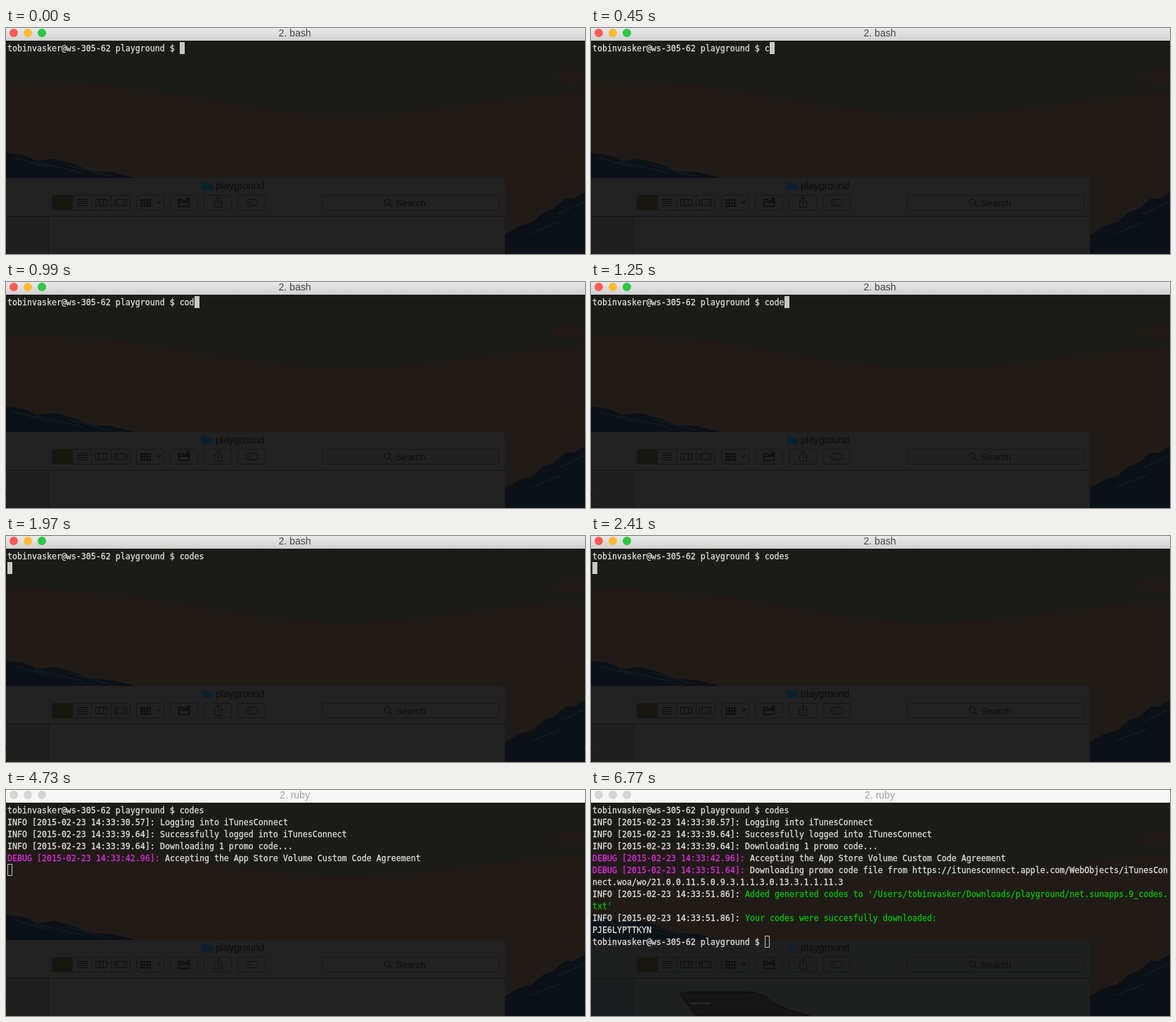
Recreate the animation shown at these times as an HTML page with a canvas. Size 823 by 321 pixels, loop 8 s.

```html
<!DOCTYPE html>
<html lang="en">
<head>
<meta charset="utf-8">
<title>Terminal</title>
<style>
html, body { margin: 0; width: 100%; height: 100%; overflow: hidden; background: #1b1b17; }
canvas { display: block; }
</style>
</head>
<body>
<canvas id="stage" width="823" height="321"></canvas>
<script>
const ctx = document.getElementById('stage').getContext('2d');
const LOOP = 8000, CELL = 7, ROW = 17, LEFT = 2, TOP = 20;
const MONO = '11.627px "DejaVu Sans Mono", monospace';
const SANS = '"Liberation Sans", Arial, sans-serif';
const WHITE = '#dcdcd8', MAGENTA = '#d32fd3', GREEN = '#04c204';
const USER = 'tobinvasker';
const PROMPT = USER + '@ws-305-62 playground $ ';
const COMMAND = 'codes';
const KEY_TIMES = [450, 720, 990, 1250, 1610];
const ENTER = 1970, LOGIN = 2940, DOWNLOAD = 4730, DONE = 6770;

const entry = (at, level, time, text, color = WHITE) => ({
  at, color, text,
  prefix: `${level} [2015-02-23 14:33:${time}]: `,
  prefixColor: level === 'DEBUG' ? MAGENTA : WHITE
});
const plain = (at, text, color = WHITE) => ({ at, text, color, prefix: '' });

const output = [
  entry(LOGIN, 'INFO', '30.57', 'Logging into iTunesConnect'),
  entry(DOWNLOAD, 'INFO', '39.64', 'Successfully logged into iTunesConnect'),
  entry(DOWNLOAD, 'INFO', '39.64', 'Downloading 1 promo code...'),
  entry(DOWNLOAD, 'DEBUG', '42.96', 'Accepting the App Store Volume Custom Code Agreement'),
  entry(DONE, 'DEBUG', '51.64', 'Downloading promo code file from https://itunesconnect.apple.com/WebObjects/iTunesCon'),
  plain(DONE, 'nect.woa/wo/21.0.0.11.5.0.9.3.1.1.3.0.13.3.1.1.11.3'),
  entry(DONE, 'INFO', '51.86', `Added generated codes to '/Users/${USER}/Downloads/playground/net.sunapps.9_codes.`, GREEN),
  plain(DONE, "txt'", GREEN),
  entry(DONE, 'INFO', '51.86', 'Your codes were succesfully downloaded:', GREEN),
  plain(DONE, 'PJE6LYPTTKYN'),
  plain(DONE, PROMPT)
];

function rect(x, y, w, h, color) {
  ctx.fillStyle = color;
  ctx.fillRect(x, y, w, h);
}

function shape(path, fill, stroke, width = 1) {
  const p = new Path2D(path);
  if (fill) { ctx.fillStyle = fill; ctx.fill(p); }
  if (stroke) { ctx.strokeStyle = stroke; ctx.lineWidth = width; ctx.stroke(p); }
}

function box(x, y, w, h, radius, stroke, fill) {
  ctx.beginPath();
  ctx.roundRect(x + .5, y + .5, w - 1, h - 1, radius);
  if (fill) { ctx.fillStyle = fill; ctx.fill(); }
  ctx.strokeStyle = stroke;
  ctx.lineWidth = 1;
  ctx.stroke();
}

function label(text, x, y, size, color, align = 'left') {
  ctx.font = `${size}px ${SANS}`;
  ctx.textAlign = align;
  ctx.fillStyle = color;
  ctx.fillText(text, x, y);
}

function drawWallpaper() {
  rect(0, 18, 823, 303, '#211b18');
  shape('M0 18H823V60Q790 54 769 72Q790 82 823 80V92C750 94 690 104 620 113C560 121 480 126 410 119C320 110 240 91 150 82Q70 74 0 75Z', '#1b1b17');
  shape('M0 177L28 181L44 189L70 186L98 194L121 203L152 205L188 214H0Z', '#0b1116');
  shape('M10 184L60 198M40 190L110 206M88 195L150 211', null, '#101a21', 2);
  shape('M823 233L806 243L796 242L778 257L764 262L748 276L730 281L709 293V321H823Z', '#0b1116');
  shape('M823 246L785 264M790 274L745 292', null, '#101a21', 2);
}

function drawToolbarIcons(ink) {
  for (let y = 243; y <= 252; y += 3) shape(`M101 ${y + .5}H116`, null, ink);
  shape('M127.5 243.5H143.5V252.5H127.5ZM132.5 243V253M138.5 243V253', null, ink);
  shape('M154.5 243V253M157.5 243.5H168.5V252.5H157.5ZM171.5 243V253', null, ink);
  for (let y = 243; y < 253; y += 4)
    for (let x = 191; x < 207; x += 4) rect(x, y, 3, 3, ink);
  shape('M214 246L217 249L220 245', null, ink, 1.4);
  shape('M245.5 253.5V243.5H250L252 245.5H260.5V253.5ZM246 247.5H260M256 243H262M259 240V246', null, ink, 1.4);
  shape('M299 245.5H296.5V254.5H306.5V245.5H304M301.5 251V240M298.5 243L301.5 240L304.5 243', null, ink);
  box(341, 243, 17, 10, 4, ink);
  rect(345, 247, 2, 2, ink);
  shape('M546 247A4 4 0 1 1 538 247A4 4 0 1 1 546 247M545 250L549 254', null, ink, 1.2);
}

function drawFinder(done) {
  const ink = '#0e0e0e', line = '#171717';
  ctx.beginPath();
  ctx.roundRect(-6, 213, 715, 120, 5);
  ctx.fillStyle = done ? '#1e1f1f' : '#212121';
  ctx.fill();
  rect(0, 267, 709, 1, '#151515');
  rect(0, 268, 60, 53, done ? '#1c1d1e' : '#1f1f1f');
  rect(60, 268, 1, 53, '#151515');
  rect(0, 299, 1, 5, ink);
  rect(0, 318, 4, 1, ink);

  shape('M278 220Q278 219 279 219H284L286 221H293Q294 221 294 222V229Q294 230 293 230H279Q278 230 278 229Z', done ? '#142027' : '#0b202c');
  label('playground', 298, 229, 14, ink);

  box(65, 237, 112, 22, 3, line);
  rect(66, 238, 28, 20, '#17170f');
  [94, 121, 149].forEach(x => rect(x, 238, 1, 20, line));
  [185, 233, 281, 329].forEach(x => box(x, 237, 40, 22, 3, line));
  box(449, 237, 252, 22, 3, line);
  drawToolbarIcons(ink);
  label('Search', 554, 253, 13.6, ink);

  if (done) {
    shape('M126 290Q128 287 136 287H226Q242 288 252 297Q270 311 312 321H150Z', '#151515', '#0b0b0b');
    shape('M142 303H170', null, '#292929', 2);
  }
}

function drawTitleBar(time) {
  const active = time < LOGIN;
  const bar = ctx.createLinearGradient(0, 0, 0, 18);
  bar.addColorStop(0, active ? '#e9e9e9' : '#f6f6f6');
  bar.addColorStop(1, active ? '#d1d1d1' : '#f6f6f6');
  rect(0, 0, 823, 18, bar);
  const lights = active ? ['#fc5b57', '#fdbb32', '#2fc744'] : Array(3).fill('#d5d5d5');
  lights.forEach((color, i) => {
    ctx.beginPath();
    ctx.arc(11 + 20 * i, 7, 6, 0, Math.PI * 2);
    ctx.fillStyle = color;
    ctx.fill();
  });
  const title = active ? '2. bash' : time < DOWNLOAD ? '2. sh' : '2. ruby';
  label(title, 410.5, 12, 14, active ? '#454545' : '#a3a3a3', 'center');
}

function type(text, column, row, color) {
  const x = LEFT + column * CELL, y = TOP + row * ROW + 13;
  ctx.font = MONO;
  ctx.textAlign = 'left';
  ctx.fillStyle = ctx.strokeStyle = color;
  ctx.lineWidth = .3;
  ctx.fillText(text, x, y);
  ctx.strokeText(text, x, y);
}

function drawTerminal(time) {
  const typed = COMMAND.slice(0, KEY_TIMES.filter(t => time >= t).length);
  const lines = output.filter(line => time >= line.at);
  type(PROMPT + typed, 0, 0, WHITE);
  lines.forEach((line, i) => {
    if (line.prefix) type(line.prefix, 0, i + 1, line.prefixColor);
    type(line.text, line.prefix.length, i + 1, line.color);
  });

  let column = 0, row = lines.length + 1;
  if (time < ENTER) { column = PROMPT.length + typed.length; row = 0; }
  if (time >= DONE) { column = PROMPT.length; row = lines.length; }
  const x = LEFT + column * CELL, y = TOP + row * ROW;
  if (time < LOGIN) rect(x, y, CELL, ROW, '#c9c9c2');
  else box(x, y, CELL, ROW, 0, '#c9c9c2');
}

function frame(now) {
  const time = now % LOOP;
  drawWallpaper();
  drawFinder(time >= DONE);
  drawTitleBar(time);
  drawTerminal(time);
}

const start = performance.now();
function tick() {
  frame(performance.now() - start);
  requestAnimationFrame(tick);
}
tick();
</script>
</body>
</html>
```
